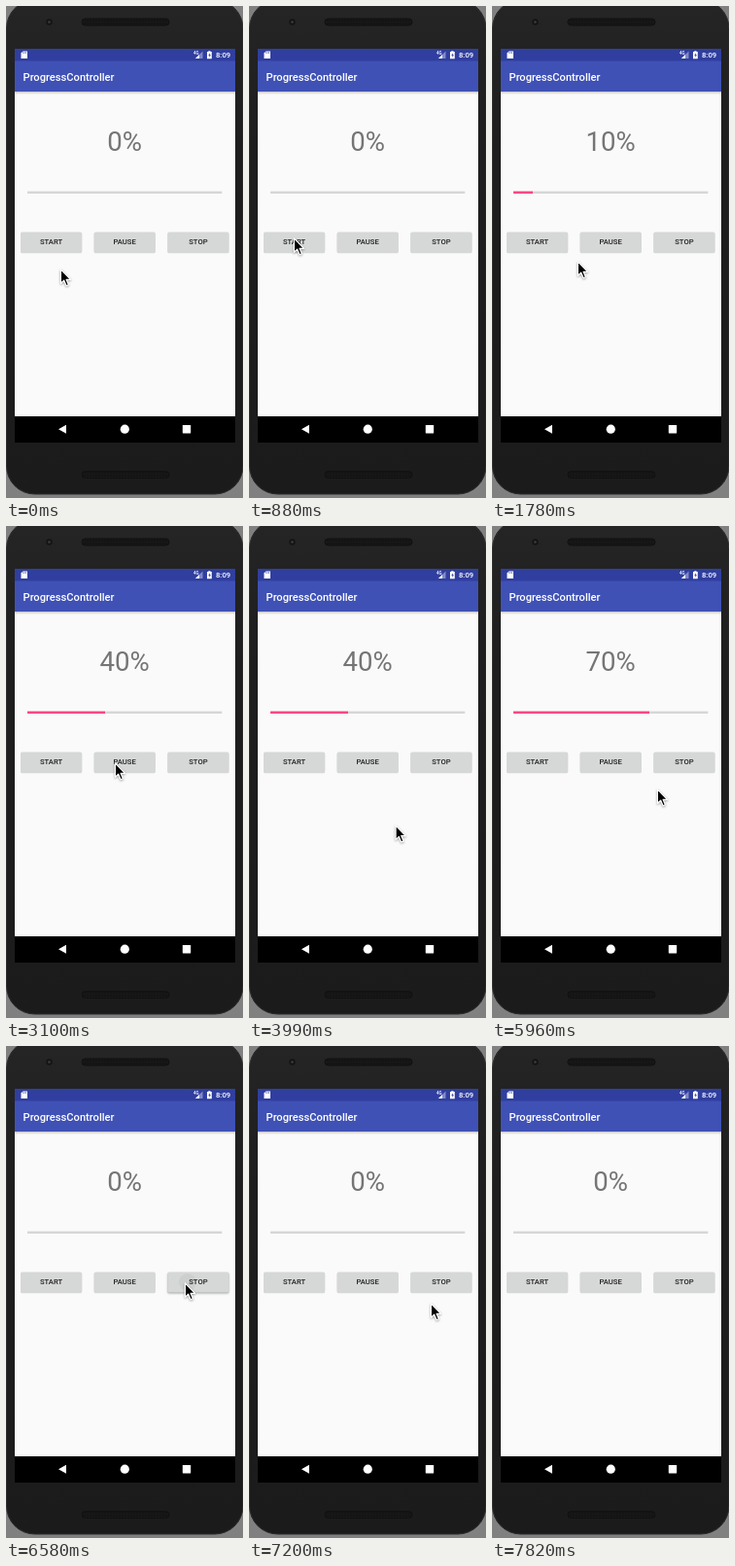
Animation of 244x506 px, one loop 8 s. Source, as an HTML page:

```html
<!DOCTYPE html>
<html lang="en">
<head>
<meta charset="utf-8">
<title>ProgressController</title>
<style>
  html, body { margin: 0; width: 100%; height: 100%; overflow: hidden; background: #808080; }
  svg { display: block; width: 100vw; height: 100vh; }
  text { font-family: Roboto, "Open Sans", sans-serif; }
  .label { font-size: 7.7px; font-weight: 500; fill: #212121; text-anchor: middle; }
  .bar { font-weight: 500; fill: #fff; }
  #percent { font-size: 27.6px; fill: #757575; text-anchor: middle; }
  #cursor { filter: drop-shadow(0 1px 1px rgba(0, 0, 0, .35)); }
</style>
</head>
<body>
<svg viewBox="0 0 244 506" xmlns="http://www.w3.org/2000/svg">
  <defs>
    <linearGradient id="body" x1="0" x2="0" y1="0" y2="1">
      <stop offset="0" stop-color="#252525"/>
      <stop offset=".3" stop-color="#1e1e1e"/>
      <stop offset="1" stop-color="#1b1b1b"/>
    </linearGradient>
    <linearGradient id="drop" x1="0" x2="0" y1="0" y2="1">
      <stop offset="0" stop-color="#000" stop-opacity=".2"/>
      <stop offset="1" stop-color="#000" stop-opacity="0"/>
    </linearGradient>
    <pattern id="mesh" width="3" height="3" patternUnits="userSpaceOnUse">
      <rect width="3" height="3" fill="#141414"/>
      <circle cx="1.5" cy="1.5" r=".8" fill="#1b1b1b"/>
    </pattern>
    <filter id="soft" x="-20%" y="-40%" width="140%" height="180%">
      <feGaussianBlur stdDeviation="1.2"/>
    </filter>
  </defs>

  <!-- phone -->
  <rect x=".5" y="-6" width="243.500" height="508" rx="29" fill="url(#body)" stroke="#2b2b2b"/>
  <circle cx="44.5" cy="16.5" r="3.2" fill="#141414"/>
  <circle cx="44.5" cy="16.5" r="1.3" fill="#3a3d42"/>
  <rect x="78" y="13" width="90" height="7" rx="3.5" fill="url(#mesh)" stroke="#111"/>
  <rect x="78" y="478.500" width="90" height="7" rx="3.5" fill="url(#mesh)" stroke="#111"/>

  <!-- screen -->
  <rect x="9" y="44" width="227" height="405" fill="#000"/>
  <rect x="9" y="56" width="227" height="366" fill="#fafafa"/>
  <rect x="9" y="44" width="227" height="13" fill="#303f9f"/>
  <rect x="9" y="56.500" width="227" height="31.500" fill="#3f51b5"/>
  <rect x="9" y="88" width="227" height="3" fill="url(#drop)"/>
  <text class="bar" x="17.500" y="76.700" font-size="11.150">ProgressController</text>

  <!-- status icons -->
  <path d="M17.500 46.500H22V54H15.500V48.500Z" fill="#fff"/>
  <path d="M17.700 47.200v1.700M19.200 47.200v1.700M20.700 47.200v1.700" stroke="#303f9f" stroke-width=".6"/>
  <text class="bar" x="193" y="50" font-size="4.500">4G</text>
  <path d="M202.500 46.500V54H195Z" fill="#fff" opacity=".4"/>
  <path d="M199 50V54H195Z" fill="#fff"/>
  <path d="M208.300 46.200h2.200v.9h1.300V54.300h-4.800V47.100h1.300Z" fill="#fff"/>
  <path d="M209.800 48.200l-1.500 2.800h1.100v2l1.500-2.800h-1.100Z" fill="#303f9f"/>
  <text class="bar" x="216" y="53.200" font-size="7.700">8:09</text>

  <!-- navigation -->
  <g fill="#fff">
    <path d="M54 435.200L62 430.700v9Z"/>
    <circle cx="122.300" cy="435.200" r="4.600"/>
    <rect x="181.800" y="431" width="8.400" height="8.400" rx=".6"/>
  </g>

  <text id="percent" x="122.200" y="149">0%</text>
  <rect x="22" y="190.600" width="200.300" height="2.300" fill="#d5d5d5"/>
  <rect id="fill" x="22" y="190.600" width="0" height="2.300" fill="#ff4081"/>
  <g id="buttons"></g>

  <path id="cursor" d="M0 0V14.500L3.300 11.400L5.700 17L8 16L5.700 10.500H10.200Z"
        fill="#000" stroke="#fff" stroke-width="1.200" stroke-linejoin="round"/>
</svg>
<script>
const LOOP = 8000;
const $ = id => document.getElementById(id);

// [time, percent]
const progress = [[0, 0], [1330, 10], [1860, 20], [2400, 30], [2930, 40],
  [4610, 50], [5150, 60], [5690, 70], [6220, 80], [6490, 0]];

// Each move starts where the one before ended and jumps in even steps.
const moves = [
  { from: 360, to: 880, steps: 7, path: [[56, 270], [53, 250], [49, 230], [46, 238]] },
  { from: 1690, to: 1950, steps: 4, path: [[46, 238], [68, 251], [88, 262], [99, 269], [103, 272]] },
  { from: 2840, to: 3100, steps: 4, path: [[103, 272], [112, 243]] },
  { from: 3450, to: 3810, steps: 5, path: [[112, 243], [145, 282], [170, 320]] },
  { from: 3990, to: 4430, steps: 6, path: [[170, 320], [112, 282], [57, 243]] },
  { from: 4970, to: 5150, steps: 3, path: [[57, 243], [162, 303]] },
  { from: 5870, to: 6310, steps: 6, path: [[162, 303], [170, 270], [179, 252], [184, 243]] },
  { from: 7200, to: 7640, steps: 6,
    path: [[184, 243], [187, 264], [202, 312], [222, 380], [233, 440], [228, 485], [215, 503]] }
];
const CURSOR_GONE = 7820;

// Times of the touch stages: small, medium, wide, over.
const clicks = [
  { button: 0, x: 48, y: 240, at: [1330, 1420, 1420, 1690] },
  { button: 1, x: 112, y: 243, at: [3360, 3360, 3360, 3450] },
  { button: 0, x: 60, y: 243, at: [4610, 4700, 4790, 4970] },
  { button: 2, x: 187, y: 243, at: [6490, 6580, 6670, 6930] }
];
const radii = [5, 9, 13], shades = [0.06, 0.045, 0.03];

function makeButton(name, i) {
  const x = [15, 90.6, 166.3][i];
  const box = `x="${x}" width="63.200" height="21" rx="1.500"`;
  $("buttons").insertAdjacentHTML("beforeend", `
    <clipPath id="clip${i}"><rect ${box} y="232.600"/></clipPath>
    <rect ${box} y="233.200" fill="#000" opacity=".14"/>
    <rect id="lift${i}" ${box} y="233.800" fill="#000" opacity="0" filter="url(#soft)"/>
    <rect ${box} y="232.600" fill="#d6d7d7"/>
    <circle id="ripple${i}" clip-path="url(#clip${i})"/>
    <text class="label" x="${x + 31.6}" y="245.400">${name}</text>`);
}
["START", "PAUSE", "STOP"].forEach(makeButton);

const lastIndex = (times, t) => times.filter(v => v <= t).length - 1;

function along(path, p) {
  const q = p * (path.length - 1);
  const i = Math.min(Math.floor(q), path.length - 2);
  return [0, 1].map(k => path[i][k] + (path[i + 1][k] - path[i][k]) * (q - i));
}

function cursorAt(t) {
  const i = lastIndex(moves.map(m => m.from), t);
  if (i < 0) return moves[0].path[0];
  const { from, to, steps, path } = moves[i];
  const done = t >= to ? steps : 1 + Math.floor((t - from) / (to - from) * (steps - 1));
  return along(path, done / steps);
}

function drawButton(i, t) {
  const click = clicks.find(c => c.button === i && t >= c.at[0] && t < c.at[3]);
  const stage = click ? lastIndex(click.at, t) : 0;
  const ripple = $("ripple" + i);
  ripple.setAttribute("opacity", click ? shades[stage] : 0);
  if (click) {
    ripple.setAttribute("cx", click.x);
    ripple.setAttribute("cy", click.y);
    ripple.setAttribute("r", radii[stage]);
  }
  $("lift" + i).setAttribute("opacity", click && stage < 2 ? 0.22 : 0);
}

function draw() {
  const t = performance.now() % LOOP;
  const value = progress[lastIndex(progress.map(p => p[0]), t)][1];
  $("percent").textContent = value + "%";
  $("fill").setAttribute("width", value * 2);
  for (let i = 0; i < 3; i++) drawButton(i, t);
  const [x, y] = cursorAt(t);
  $("cursor").setAttribute("transform", `translate(${x + 0.4} ${y + 0.8})`);
  $("cursor").setAttribute("visibility", t < CURSOR_GONE ? "visible" : "hidden");
  requestAnimationFrame(draw);
}
draw();
</script>
</body>
</html>
```
